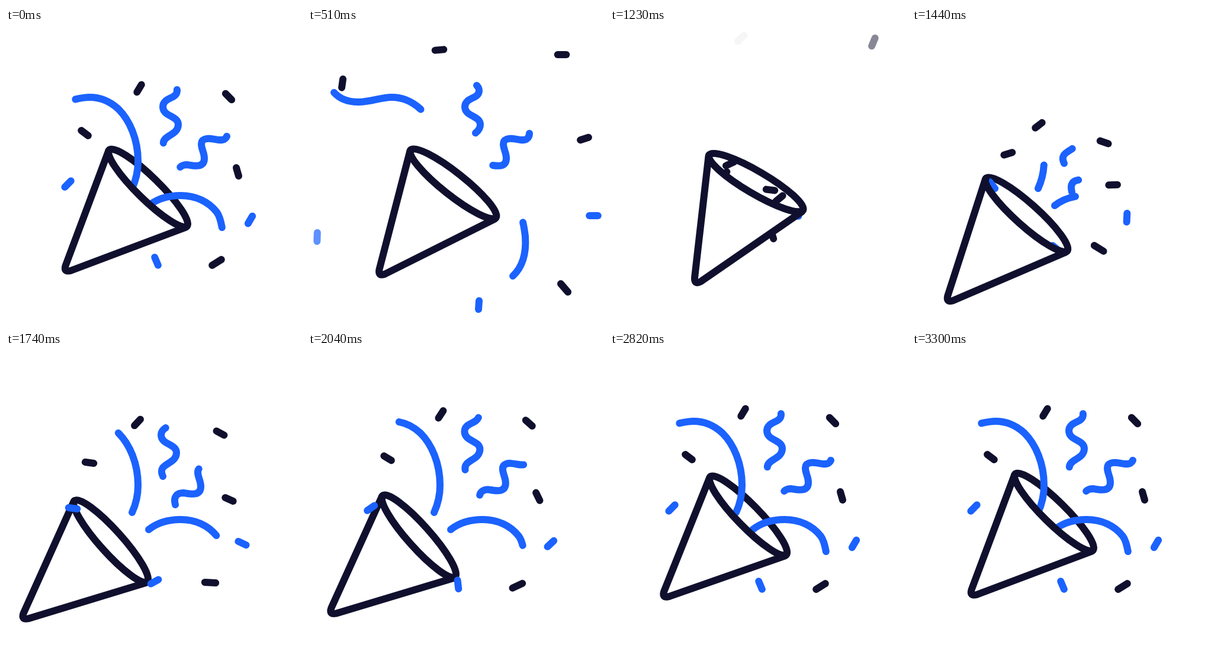
These frames come from a looping animation (500x500 px, 3830 ms). An HTML page:

```html
<!DOCTYPE html>
<html lang="en">
<head>
<meta charset="utf-8">
<title>Party popper</title>
<style>
  html, body { margin: 0; width: 100%; height: 100%; overflow: hidden; background: #fff; }
  svg { display: block; width: 100vw; height: 100vh; }
  svg * { stroke-width: 12; stroke-linecap: round; stroke-linejoin: round; }
  .dark { stroke: #10102e; }
  .blue { stroke: #1b62ff; }
</style>
</head>
<body>
<svg viewBox="0 0 500 500" fill="none">
  <g class="cone dark"><ellipse rx="92" ry="19" transform="translate(240 270.5) rotate(44.4)"/></g>
  <g id="ribbons" class="blue"></g>
  <g id="front" class="cone dark" fill="#fff">
    <path d="M174.3 206.1A92 19 44.4 0 0 305.7 334.9L303 337L109 410Q97 413 100.5 401.5L173 208Z"/>
  </g>
  <g id="leaving"></g>
  <g id="arriving"></g>
</svg>
<script>
const LOOP = 3830, END = 3300, STEP = 30, BURST = 1200;
const $ = id => document.getElementById(id);

function add(parent, tag, attrs) {
  const el = document.createElementNS('http://www.w3.org/2000/svg', tag);
  for (const name in attrs) el.setAttribute(name, attrs[name]);
  return parent.appendChild(el);
}

// Smooth monotone curve through [time, value] keys, at rest at both ends.
function curve(...keys) {
  const last = keys.length - 1;
  const rate = i => (keys[i + 1][1] - keys[i][1]) / (keys[i + 1][0] - keys[i][0]);
  const slopes = keys.map((_, i) => {
    if (i === 0 || i === last) return 0;
    const a = rate(i - 1), b = rate(i);
    return a * b > 0 ? 2 * a * b / (a + b) : 0;
  });
  return t => {
    if (t <= keys[0][0]) return keys[0][1];
    if (t >= keys[last][0]) return keys[last][1];
    let i = 0;
    while (t >= keys[i + 1][0]) i++;
    const [t0, v0] = keys[i], [t1, v1] = keys[i + 1];
    const w = t1 - t0, u = (t - t0) / w, s = u * u * (3 - 2 * u);
    return v0 + (v1 - v0) * s
      + w * u * (1 - u) * ((1 - u) * slopes[i] - u * slopes[i + 1]);
  };
}

// Position of the cone's tip and its tilt.
const tipX = curve([0, 102], [510, 122.5], [1200, 147], [1230, 146], [1500, 45], [1620, 35],
  [1740, 30.5], [1800, 30], [2160, 48.5], [2340, 63.4], [2700, 87.5], [2820, 92.5], [3300, 102]);
const tipY = curve([0, 408], [510, 414.5], [1230, 428], [1500, 463], [1620, 458], [1740, 448],
  [2160, 435.5], [2340, 426.5], [2700, 415.5], [2820, 411], [3300, 408]);
const tilt = curve([0, 0], [510, -6], [1230, -14], [1500, 0], [1740, 3.7], [1860, 4],
  [2340, 3.3], [2820, 1.3], [3300, 0]);

const away = curve([0, 0], [510, 1], [1230, 1.3]);
const remaining = curve([1200, 10], [1230, 7.5], [1740, 1], [2250, 0]);

// Each ribbon shows the stretch of its path between tail and head.
const ribbons = [
  {
    d: 'M213 271C219 258 223 243 223 225C223 188 209 156 190 137C176 124 160 117 141 117' +
       'C122 117 108 125 85 125C67 125 53 119 44 109',
    drift: [0, 0],
    out: [curve([0, 0], [510, 143], [960, 301]), curve([0, 222], [510, 301])],
    in: [() => 0, curve([1250, 0], [1740, 144], [2340, 210], [2700, 222])]
  },
  {
    d: 'M241 300C256 288 274 283 295 283C320 283 342 293 356 311C362 319 365 335 367 352' +
       'C369 380 363 403 346 419',
    drift: [0, 0],
    out: [curve([0, 0], [510, 146], [960, 244]), curve([0, 155], [510, 244])],
    in: [() => 0, curve([1250, 0], [1740, 126], [2340, 153], [2700, 155])]
  },
  {
    d: 'M268 203C257 180 291 184 291 163C291 148 265 150 265 133C265 117 289 120 289 106' +
       'C289 102 287 99 285 97',
    drift: [-3, 7],
    out: [curve([0, 9], [510, 34], [1000, 144]), curve([0, 133], [510, 144])],
    in: [curve([1740, 0], [2250, 9]), curve([1250, 0], [1740, 108], [2250, 133])]
  },
  {
    d: 'M292 251C288 236 296 231 306 231C318 233 335 237 335 220C335 210 330 205 330 196' +
       'C330 187 340 186 346 187C356 188 366 192 371 186C373 184 374 181 374 178',
    drift: [-6, 7],
    out: [curve([0, 17], [510, 36], [1000, 152]), curve([0, 142], [510, 152])],
    in: [curve([1740, 0], [2250, 17]), curve([1250, 0], [1740, 97], [2250, 142])]
  }
];
for (const r of ribbons) r.el = add($('ribbons'), 'path', { d: r.d });

// rest, out and back hold x, y, angle; spin is the early turn on arrival.
const bits = [
  { color: 'dark', rest: [225, 102, -59], out: [-3, -65, -126], back: [-3, 17, 12], spin: 34, gone: 1242 },
  { color: 'dark', rest: [376, 116, 45], out: [53, -71, -225], back: [-14, 21, -17], spin: -38, gone: 1380 },
  { color: 'dark', rest: [133, 177.5, 37], out: [-75, -84, -119], back: [8, 9.5, -29], spin: -90, gone: 960 },
  { color: 'dark', rest: [391, 243, 74], out: [76, -56, -92], back: [-14, 6, -50], spin: -114, gone: 900 },
  { color: 'dark', rest: [356, 396, -32], out: [77, 43, -99], back: [-11, -6.5, 35], spin: 105, gone: 1000, half: 9.2 },
  { color: 'blue', rest: [104.5, 263.5, -45], out: [-89, 89.5, -43], back: [8.5, 0.5, 53], spin: 160, gone: 720 },
  { color: 'blue', rest: [254, 394, 67], out: [34.5, 74, -153], back: [-3, -6, 84], spin: 250, gone: 860 },
  { color: 'blue', rest: [412.5, 324, -60], out: [70, -7, -120], back: [-13.5, -1, 85], spin: 250, gone: 830 }
];
for (const b of bits) {
  const half = b.half || 7.3;
  const make = id => add($(id), 'line', { class: b.color, x1: -half, x2: half });
  b.leaving = make('leaving');
  b.arriving = make('arriving');
}

function place(el, [x, y, angle], [dx, dy], k, turn) {
  el.setAttribute('transform', `translate(${x + dx * k} ${y + dy * k}) rotate(${angle + turn})`);
}

function draw(t) {
  const burst = t >= BURST;
  const e = away(t), k = remaining(t);

  const pose = `translate(${tipX(t) - 102} ${tipY(t) - 408}) rotate(${tilt(t)} 102 408)`;
  for (const el of document.querySelectorAll('.cone')) el.setAttribute('transform', pose);

  for (const { el, drift, out, in: grow } of ribbons) {
    const [tail, head] = (burst ? grow : out).map(f => f(t));
    const shift = burst ? k : 0;
    el.style.display = head - tail > 1 ? '' : 'none';
    el.style.strokeDasharray = `${Math.max(head - tail, 0)} 9999`;
    el.style.strokeDashoffset = -tail;
    el.setAttribute('transform', `translate(${drift[0] * shift} ${drift[1] * shift})`);
  }

  // New confetti stays behind the cone's front until it has left the mouth.
  if (t < 1500) $('front').before($('arriving'));
  else $('leaving').after($('arriving'));
  $('arriving').style.display = burst ? '' : 'none';

  for (const b of bits) {
    place(b.leaving, b.rest, b.out, e, b.out[2] * e);
    b.leaving.style.opacity = Math.min(1, Math.max(0, (b.gone - t) / 300));
    const turn = b.back[2];
    place(b.arriving, b.rest, b.back, k, k < 1 ? turn * k : turn + (b.spin - turn) * (k - 1) / 6.5);
  }
}

const start = performance.now();
function frame() {
  const t = (performance.now() - start) % LOOP;
  draw(Math.min(END, Math.floor(t / STEP) * STEP));
  requestAnimationFrame(frame);
}
frame();
</script>
</body>
</html>
```
